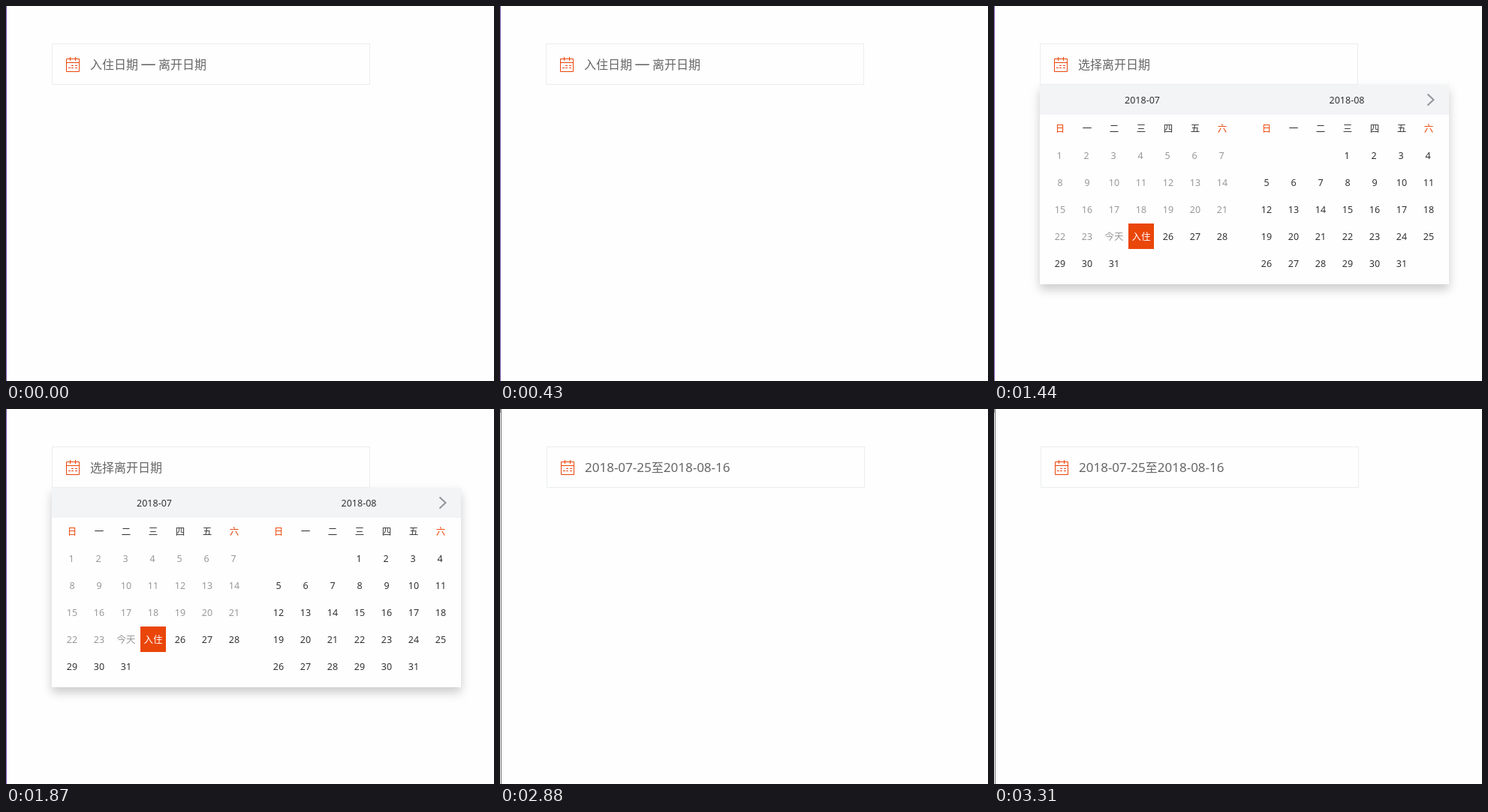
Recreate the animation shown at these times as an HTML page. Size 650 by 500 pixels, loop 3.6 s.

```html
<!DOCTYPE html>
<html lang="zh-CN">
<head>
<meta charset="utf-8">
<title>日期选择</title>
<style>
  html, body { margin: 0; width: 100%; height: 100%; overflow: hidden; background: #fefefe; }
  svg { display: block; }
  text { font: 12.5px "Noto Sans", "Noto Sans CJK SC", "Noto Sans CJK", sans-serif; }
  .mid { text-anchor: middle; }
</style>
</head>
<body>
<svg id="stage" width="650" height="500" viewBox="0 0 650 500">
  <defs>
    <filter id="shadow" x="-10%" y="-10%" width="120%" height="130%">
      <feDropShadow dx="0" dy="7" stdDeviation="6.5" flood-color="#000" flood-opacity=".2"/>
    </filter>
  </defs>
  <rect id="edge" width="1" height="500"/>
  <rect id="corner" width="1" height="5" fill="#a8a8a8"/>
  <g id="panel">
    <rect x="61" y="105" width="545" height="266" fill="#fefefe" filter="url(#shadow)"/>
    <rect x="61" y="105" width="545" height="40" fill="#f3f4f6"/>
    <path d="M577.5 117.5L585.5 125L577.5 132.5" fill="none" stroke="#92959a" stroke-width="2"/>
  </g>
  <g id="field">
    <rect x="61.5" y="50.5" width="423" height="54" fill="#fefefe" stroke="#ebeeee"/>
    <path id="icon" fill="none" d="M80.5 70.5h17v17h-17zM80.5 75.5h17M85.5 68v5M92.5 68v5
      M87 79.5h3M92 79.5h3M83 82.5h3M87 82.5h3M92 82.5h3"/>
    <g id="label" fill="#666"></g>
  </g>
</svg>
<script>
const STEP = 720;
const TODAY = 24;
const RED = '#ea4609';
const INK = '#333';
const MUTED = '#999';
const $ = id => document.getElementById(id);

// Each label part: [text, font size, optional x]
const stayDates = [['2018-07-25', 17, 112], ['至', 16], ['2018-08-16', 17]];
const steps = [
  { label: [['入住日期', 16, 112], ['—', 20, 179.4], ['离开日期', 16, 203]] },
  { label: [['选择入住日期', 16, 112]], open: true, accent: '#db6a22' },
  { label: [['选择离开日期', 16, 112]], open: true, from: 25, to: 25, todayMuted: true },
  { label: stayDates, open: true, from: 25, to: 47 },
  { label: stayDates, shift: 1, edge: '#6c6c6c' }
];

function add(parent, tag, attrs, text) {
  const el = document.createElementNS('http://www.w3.org/2000/svg', tag);
  for (const k in attrs) el.setAttribute(k, attrs[k]);
  if (text !== undefined) el.textContent = text;
  parent.appendChild(el);
  return el;
}

const centred = (x, y, text, fill) =>
  add($('panel'), 'text', { class: 'mid', x, y, fill }, text);

const weekends = [];
const cells = [];

// offset turns a day of the month into one running day number
function buildMonth(title, titleX, left, firstDay, offset) {
  centred(titleX, 130, title, INK);
  [...'日一二三四五六'].forEach((name, i) => {
    const el = centred(left + 36 * i, 167.5, name, INK);
    if (i % 6 === 0) weekends.push(el);
  });
  for (let d = 1; d <= 31; d++) {
    const slot = d - 1 + firstDay;
    const row = Math.floor(slot / 7);
    const x = left + 36 * (slot % 7) - (row === 0 ? 1 : 0);
    const y = 199 + 36 * row;
    const box = add($('panel'), 'rect', { x: x - 17, y: y - 17, width: 34, height: 34, fill: RED });
    const text = centred(x, y + 4.7, d);
    cells.push({ day: d + offset, name: d, box, text });
  }
}

buildMonth('2018-07', 197.5, 88, 0, 0);
buildMonth('2018-08', 470, 363, 3, 31);

function drawCell(cell, step) {
  const { day, box, text } = cell;
  const picked = day >= step.from && day <= step.to;
  const past = day < TODAY || (day === TODAY && step.todayMuted);
  box.style.display = picked ? '' : 'none';
  text.setAttribute('fill', picked ? '#fff' : past ? MUTED : INK);
  text.textContent = day === TODAY ? '今天'
    : day === step.from ? '入住'
    : day === step.to ? '离开'
    : cell.name;
}

function draw(step) {
  const shift = step.shift || 0;
  const accent = step.accent || RED;
  $('edge').setAttribute('x', shift);
  $('edge').setAttribute('fill', step.edge || '#7d55ae');
  $('corner').style.display = shift ? '' : 'none';
  $('field').setAttribute('transform', `translate(${shift} 0)`);
  $('icon').setAttribute('stroke', accent);
  $('panel').style.display = step.open ? '' : 'none';

  $('label').textContent = '';
  const line = add($('label'), 'text', { y: 84 });
  for (const [text, size, x] of step.label) {
    const part = add(line, 'tspan', x ? { x } : {}, text);
    part.style.fontSize = size + 'px';
  }
  weekends.forEach(el => el.setAttribute('fill', accent));
  cells.forEach(cell => drawCell(cell, step));
}

let shown = -1;
const start = performance.now();
function tick() {
  const i = Math.floor((performance.now() - start) / STEP) % steps.length;
  if (i !== shown) draw(steps[shown = i]);
  requestAnimationFrame(tick);
}
tick();
</script>
</body>
</html>
```
